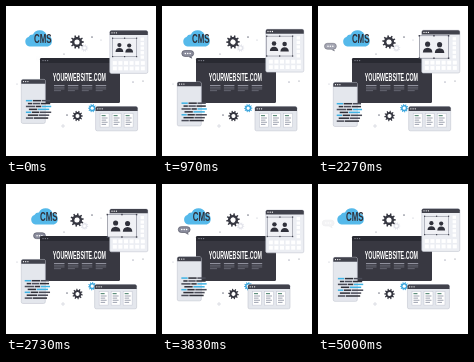
Animation, 150 px wide and 150 px high, one loop 5.03 s. Source, as an HTML page:

```html
<!DOCTYPE html>
<html lang="en">
<head>
<meta charset="utf-8">
<title>Website builder</title>
<style>
html, body { margin: 0; width: 100%; height: 100%; overflow: hidden; background: #fff; }
svg { display: block; width: 100%; height: 100%; }
text { font-family: "Liberation Sans", Arial, sans-serif; font-weight: 700; text-anchor: middle; }
</style>
</head>
<body>
<svg id="stage" viewBox="0 0 150 150">
  <g id="specks"></g>
  <g id="cloud">
    <path fill="#55b9ea" d="M5.5 17A5 5 0 0 1 4.5 7.4A5 5 0 0 1 9 5A7.5 7.5 0 0 1 22.6 5.4A6 6 0 0 1 24 17Z"/>
    <text transform="translate(18.8 13.6) scale(.58 1)" font-size="13.6" fill="#30313b">CMS</text>
  </g>
  <g id="bubble">
    <path fill="#8a8c9c" stroke="#565866" stroke-width=".7" d="M-3-3.2H3A2.8 2.8 0 0 1 3 2.6L4 4.4L.8 2.6H-3A2.9 2.9 0 0 1-3-3.2Z"/>
    <g fill="#fff"><circle cx="-2.4" cy="-.3" r=".8"/><circle cy="-.3" r=".8"/><circle cx="2.4" cy="-.3" r=".8"/></g>
  </g>
  <g id="gears"></g>
  <g id="site">
    <rect x="34" y="52" width="80" height="45" rx="1.5" fill="#383841"/>
    <path d="M34 57V53.5Q34 52 35.5 52H112.5Q114 52 114 53.5V57Z" fill="#292a32"/>
    <g fill="#858793"><circle cx="37" cy="54.6" r=".7"/><circle cx="39.3" cy="54.6" r=".7"/><circle cx="41.6" cy="54.6" r=".7"/></g>
    <text transform="translate(73.4 74.9) scale(.5 1)" font-size="10.6" fill="#fff">YOURWEBSITE.COM</text>
    <g id="columns"></g>
  </g>
  <g id="photo"></g>
  <g id="editor"></g>
  <g id="files"></g>
</svg>
<script>
const LOOP = 5030, TAU = Math.PI * 2;
const $ = id => document.getElementById(id);
const clamp = v => Math.max(0, Math.min(1, v));
const rect = (x, y, w, h, fill, extra = '') =>
  `<rect x="${x}" y="${y}" width="${w}" height="${h}" fill="${fill}" ${extra}/>`;
const dot = (x, y, r, fill) => `<circle cx="${x}" cy="${y}" r="${r}" fill="${fill}"/>`;

function frame(w, h, body) {
  return rect(0, 0, w, h, body, 'rx="1.6" stroke="#c3c7d1" stroke-width=".6"') +
    `<path d="M0 4.4V1.6Q0 0 1.6 0H${w - 1.6}Q${w} 0 ${w} 1.6V4.4Z" fill="#41424c"/>` +
    [2.2, 4.4, 6.6].map(x => dot(x, 2.2, .65, '#fff')).join('');
}

function gearPath(r, teeth) {
  const points = [];
  for (let i = 0; i < teeth; i++) {
    for (const [at, k] of [[-.28, .74], [-.15, 1], [.15, 1], [.28, .74]]) {
      const a = (i + at) / teeth * TAU;
      points.push((Math.cos(a) * r * k).toFixed(2) + ' ' + (Math.sin(a) * r * k).toFixed(2));
    }
  }
  return 'M' + points.join('L') + 'Z';
}

const gears = [
  { x: 78.5, y: 42, r: 3.8, fill: '#e4e5ec', turn: -180 },
  { x: 71, y: 36, r: 6.8, fill: '#363741', turn: 180 },
  { x: 71.5, y: 110, r: 5.3, fill: '#363741', turn: -180 },
  { x: 86.2, y: 102.2, r: 4.2, fill: '#3ba6dd', turn: 180 }
];
$('gears').innerHTML = gears.map(g =>
  `<g><path d="${gearPath(g.r, 10)}" fill="${g.fill}"/>${dot(0, 0, g.r * .38, '#fff')}</g>`).join('');

$('specks').innerHTML = [[86, 31], [95, 34], [58, 48], [127, 76], [137, 75], [11, 78], [61, 109]]
  .map(([x, y], i) => dot(x, y, i % 3 ? .6 : .85, i % 2 ? '#b9bcc8' : '#7d808e')).join('') +
  '<path d="M55 120H59M57 118V122" stroke="#d5d7df" stroke-width=".8"/>';

let columns = '';
for (let c = 0; c < 4; c++)
  for (let row = 0; row < 4; row++)
    columns += rect(48 + c * 13.9, 79 + row * 1.8, row === 3 ? 7 : 10.5, .7, row ? '#777985' : '#b6b8c5');
$('columns').innerHTML = columns;

// Photo window with a tool column and a thumbnail grid
let tools = '';
for (let i = 0; i < 5; i++) tools += rect(30.8, 7 + i * 4.5, 3.4, 3.2, '#fff');
for (let row = 0; row < 2; row++)
  for (let c = 0; c < 6; c++) tools += rect(3 + c * 5.6, 30.5 + row * 5.4, 4, 3.8, '#fff');
const person = (x, y) =>
  `<g transform="translate(${x} ${y})" fill="#30313b"><circle cy="-2.5" r="2.1"/><path d="M-3.9 4.4Q-3.8.7 0 .5Q3.8.7 3.9 4.4Z"/></g>`;
const corners = [-24, -12, 0].flatMap(x => [-9.2, 9.2].map(y => rect(x - .6, y - .6, 1.2, 1.2, '#41424e'))).join('');
$('photo').innerHTML = frame(38, 42.8, '#eceef3') + tools +
  `<g id="picture">${rect(-24, -9.2, 24, 18.4, '#f0f1f5', 'stroke="#777a88" stroke-width=".5"')}` +
  person(-17.2, .2) + person(-7.4, .6) + corners + '</g>';

// Each row: indent, then segment lengths
const code = [[0, 7, 9, 9], [2, 5, 8, 10], [0, 10, 6, 10], [3, 9, 12], [0, 6, 8, 12], [2, 11, 11], [0, 8, 15]];
const inks = ['#3fb2e3', '#2f3039', '#4a4c58', '#2f3039'];
const codeRows = code.map(([x, ...parts], row) => parts.map((w, i) => {
  const bar = rect(x, row * 2.9, w - .7, 1.5, inks[(i + row) % 4]);
  x += w;
  return bar;
}).join('')).join('');
$('editor').innerHTML = frame(24, 44, '#e4e7ed') + `<g id="code">${codeRows}</g>`;

let pages = '';
for (let c = 0; c < 3; c++) {
  const x = 4.5 + c * 12;
  pages += rect(x, 6.8, 9, 13.7, '#fff', 'stroke="#c0c4d0" stroke-width=".5"') +
    rect(x + 1.5, 8.4, 4, 1.2, '#5f8f7c');
  for (let i = 0; i < 4; i++) pages += rect(x + 1.5, 11 + i * 2.1, i % 2 ? 4.5 : 6, .8, '#858b9c');
}
$('files').innerHTML = frame(42, 24.2, '#e4e7ed') + pages;

const place = (id, x, y, more = '') =>
  $(id).setAttribute('transform', `translate(${x.toFixed(3)} ${y.toFixed(3)}) ${more}`);

function draw(time) {
  const p = time % LOOP / LOOP, a = p * TAU;
  const sin = Math.sin(a), cos = Math.cos(a);
  place('cloud', 21 - 3 * cos, 23.5);
  place('photo', 103.8, 24.6 - 1.4 * sin);
  // The picture grows, holds, then shrinks back
  const grow = clamp(.5 - .9 * Math.cos(a + .2));
  place('picture', 26.8, 16.8, `scale(${1 + .22 * grow})`);
  place('editor', 15.3, 74.7 + 2.2 * Math.sin(a - .625));
  place('code', 4 + .6 * cos, 20.5);
  place('files', 89.6 + 3.6 * sin, 100.6);

  const q = p * 2 % 1;
  place('bubble', 35.7 - 25.8 * q, 53.2 - 14 * q);
  $('bubble').setAttribute('opacity', clamp(Math.min(q * 14, (1 - q) * 8)));

  [...$('gears').children].forEach((el, i) => {
    const g = gears[i];
    el.setAttribute('transform', `translate(${g.x} ${g.y}) rotate(${g.turn * p})`);
  });
}

const start = performance.now();
function tick() {
  draw(performance.now() - start);
  requestAnimationFrame(tick);
}
draw(0);
requestAnimationFrame(tick);
</script>
</body>
</html>
```
